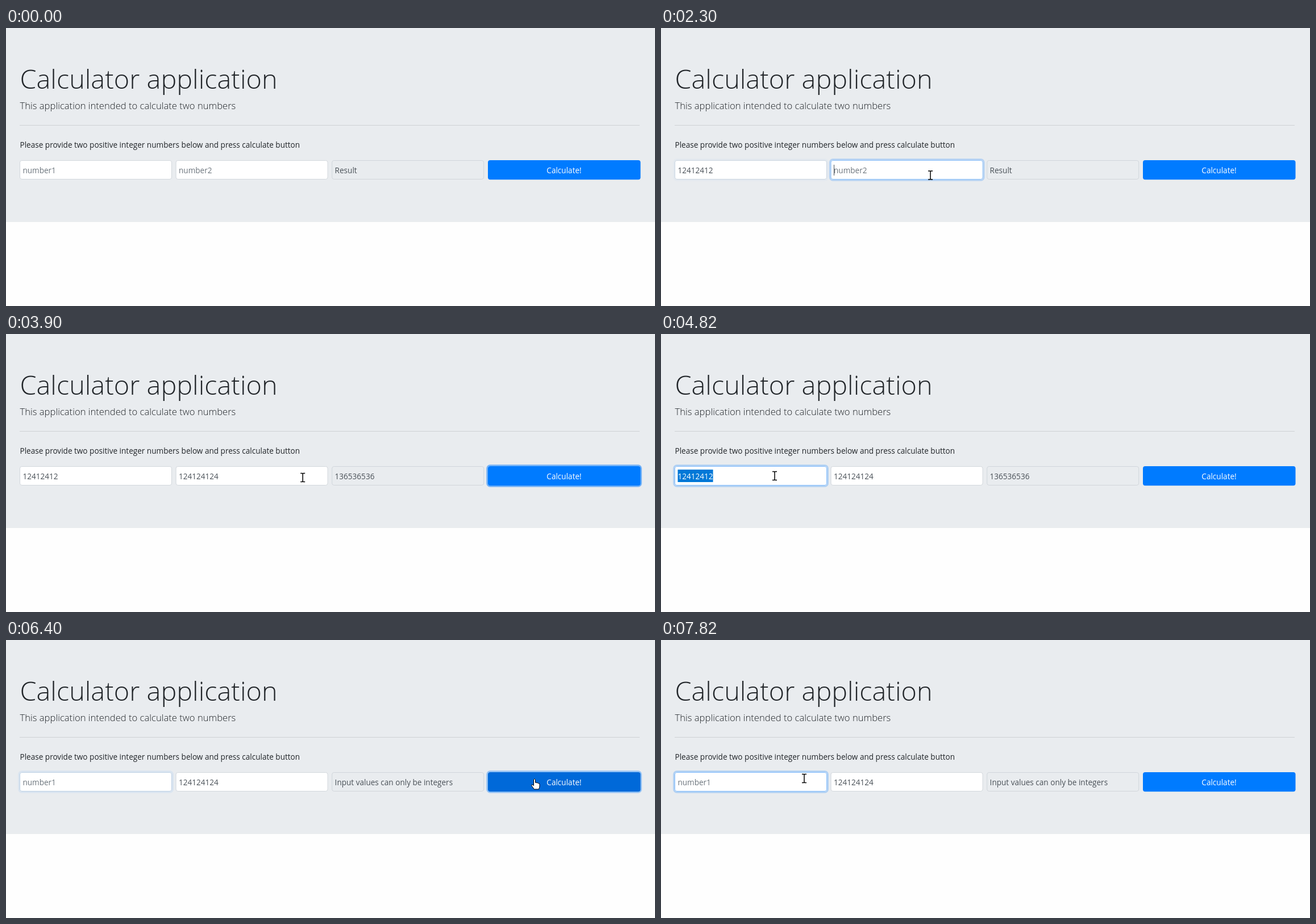
Write an HTML page that moves like this. It is 1142x490 px and loops after 8000 ms.

```html
<!DOCTYPE html>
<html lang="en">
<head>
<meta charset="utf-8">
<title>Calculator application</title>
<style>
  html, body { margin: 0; width: 100%; height: 100%; overflow: hidden; background: #fefefe; }
  svg { display: block; width: 1142px; height: 490px; }
  text { font: 13.57px "Open Sans", "Noto Sans", sans-serif; fill: #212529; white-space: pre; }
  .title { font-size: 46.8px; font-weight: 300; }
  .lead { font-size: 16.63px; font-weight: 300; }
  .box { stroke: #ced4da; stroke-width: .9; }
  .ring { fill: none; stroke: #007bff; stroke-width: 2.8; }
  .button { fill: #fff; text-anchor: middle; }
</style>
</head>
<body>
<svg viewBox="0 0 1142 490">
  <rect width="1142" height="342" fill="#e9ecef"/>
  <text class="title" x="24.5" y="107">Calculator application</text>
  <text class="lead" x="24.5" y="143">This application intended to calculate two numbers</text>
  <path d="M24 171.5H1115" stroke="#cfd2d5"/>
  <text x="24.5" y="210.5">Please provide two positive integer numbers below and press calculate button</text>
  <g id="form"></g>
  <g id="cursor">
    <path id="arrow" d="M0 0V16.5L3.8 13L6.4 18.5L8.8 17.4L6.3 12H11.6Z" fill="#fff" stroke="#000"/>
    <path id="beam" d="M-4 -7.5H-1L0 -6.8L1 -7.5H4M0 -7V7M-4 7.5H-1L0 6.8L1 7.5H4"
      fill="none" stroke="#000" stroke-width="1.5"/>
    <path id="hand" d="M-1.5 1Q0 -1.5 1.5 1V6.5Q3 5.2 4.2 7Q6 6 6.8 7.8Q9 7.2 9 9.5V13Q9 15.5 7.3 18H-.8Q-2.5 15 -5.3 11.8Q-5.6 9.2 -3 10.3L-1.5 11.8Z"
      fill="#fff" stroke="#000" stroke-linejoin="round"/>
  </g>
</svg>
<script>
const LOOP = 8000, FADE = 150;
const $ = id => document.getElementById(id);

function add(tag, attrs) {
  const node = document.createElementNS("http://www.w3.org/2000/svg", tag);
  for (const key in attrs) node.setAttribute(key, attrs[key]);
  return $("form").appendChild(node);
}

const makeRing = x => add("rect", { class: "ring", x: x - 1.8, y: 231.7, width: 270.8, height: 36.6, rx: 5 });

function makeField(column, fill) {
  const x = 24.5 + 274.6 * column;
  return {
    x,
    ring: makeRing(x),
    box: add("rect", { class: "box", x, y: 233.5, width: 267, height: 33, rx: 3.5, fill }),
    mark: add("rect", { x: x + 5, y: 239, height: 22, fill: "#0078d7" }),
    label: add("text", { x: x + 4.9, y: 256 }),
    caret: add("rect", { y: 241, width: 1, height: 19, fill: "#495057" })
  };
}

const first = makeField(0, "#fff");
const second = makeField(1, "#fff");
const result = makeField(2, "#e9ecef");
const buttonRing = makeRing(848.5);
const button = add("rect", { x: 848, y: 233, width: 268.5, height: 34.2, rx: 4 });
add("text", { class: "button", x: 982, y: 256 }).textContent = "Calculate!";

const SELECT = 4820, CLEAR = 5150, LETTER = 5450, ADD = 3480, REJECT = 6330;

// On/off spans in ms
const focusFirst = [[900, 2200], [4560, REJECT], [7320, LOOP + FADE]];
const focusSecond = [[2200, ADD]];
const focusButton = [[ADD, 4560], [REJECT, 7320]];
const hover = [[3030, 3755], [5860, 6580]];

// Pointer moves: start, end, target x, target y, sag
const origin = [978, 452];
const moves = [
  [70, 720, 222, 241, 0],
  [860, 1400, 266, 253, 0],
  [1400, 1820, 445, 261, 0],
  [2020, 2760, 535, 256, 0],
  [2830, 3090, 888, 245, 0],
  [3700, 3960, 467, 246, 18],
  [4160, 4600, 200, 250, 0],
  [LETTER, 5970, 930, 245, -6],
  [6480, 6920, 252, 244, -4]
];

// Digits come in quick bursts of three
const keyTimes = (start, count) =>
  Array.from({ length: count }, (_, i) => start + 420 * Math.floor(i / 3) + 70 * (i % 3));
const firstKeys = keyTimes(1190, 8);
const secondKeys = keyTimes(2340, 9);
const actions = [...firstKeys, ...secondKeys, CLEAR, LETTER,
  ...[...focusFirst, ...focusSecond].map(span => span[0])];

const clamp = v => Math.max(0, Math.min(1, v));
const smooth = v => v * v * (3 - 2 * v);
const mix = (a, b, k) => a + (b - a) * k;
const blend = (a, b, k) => `rgb(${a.map((v, i) => Math.round(mix(v, b[i], k)))})`;
const active = (spans, t) => spans.some(([a, b]) => t >= a && t < b);
const typed = (text, keys, t) => text.slice(0, keys.filter(k => k <= t).length);

function amount(spans, t) {
  const ease = v => 1 - (1 - clamp(v)) ** 2;
  return spans.reduce((sum, [a, b]) => sum + ease((t - a) / FADE) - ease((t - b) / FADE), 0);
}

function pointer(t) {
  let [x, y] = origin;
  for (const [start, end, toX, toY, sag] of moves) {
    const k = smooth(clamp((t - start) / (end - start)));
    x = mix(x, toX, k);
    y = mix(y, toY, k) + sag * Math.sin(Math.PI * k);
  }
  return [x, y];
}

function drawInput(field, value, hint, focus, t, selected = false) {
  const level = amount(focus, t);
  field.ring.style.opacity = level * .25;
  field.box.style.stroke = blend([206, 212, 218], [128, 189, 255], level);
  field.label.textContent = value || hint;
  field.label.style.fill = selected ? "#fff" : value || field === result ? "#495057" : "#6c757d";
  const width = value ? field.label.getComputedTextLength() : 0;
  field.mark.setAttribute("width", selected ? width : 0);
  const last = Math.max(0, ...actions.filter(a => a <= t));
  const lit = active(focus, t) && !selected && (t - last) % 1000 < 500;
  field.caret.setAttribute("x", Math.round(field.x + 4.7 + width));
  field.caret.style.opacity = +lit;
}

function drawCursor(t) {
  const [x, y] = pointer(t);
  const inRow = y > 233 && y < 267;
  const kind = t < 70 ? "" : !inRow ? "arrow" : x > 848 ? "hand" : "beam";
  for (const id of ["arrow", "beam", "hand"]) $(id).style.display = id === kind ? "" : "none";
  $("cursor").setAttribute("transform", `translate(${x} ${y})`);
}

function draw(t) {
  const invalid = t >= LETTER && t < REJECT;
  const number = t < CLEAR ? typed("12412412", firstKeys, t) : invalid ? "a" : "";
  drawInput(first, number, "number1", focusFirst, t, t >= SELECT && t < CLEAR);
  first.box.style.fill = invalid ? "#dc3545" : "#fff";
  drawInput(second, typed("124124124", secondKeys, t), "number2", focusSecond, t);
  const answer = t < ADD ? "" : t < REJECT ? "136536536" : "Input values can only be integers";
  drawInput(result, answer, "Result", [], t);
  buttonRing.style.opacity = amount(focusButton, t) * .5;
  button.style.fill = blend([0, 123, 255], [0, 105, 217], amount(hover, t));
  drawCursor(t);
}

const start = performance.now();
function tick() {
  draw((performance.now() - start) % LOOP);
  requestAnimationFrame(tick);
}
tick();
</script>
</body>
</html>
```
